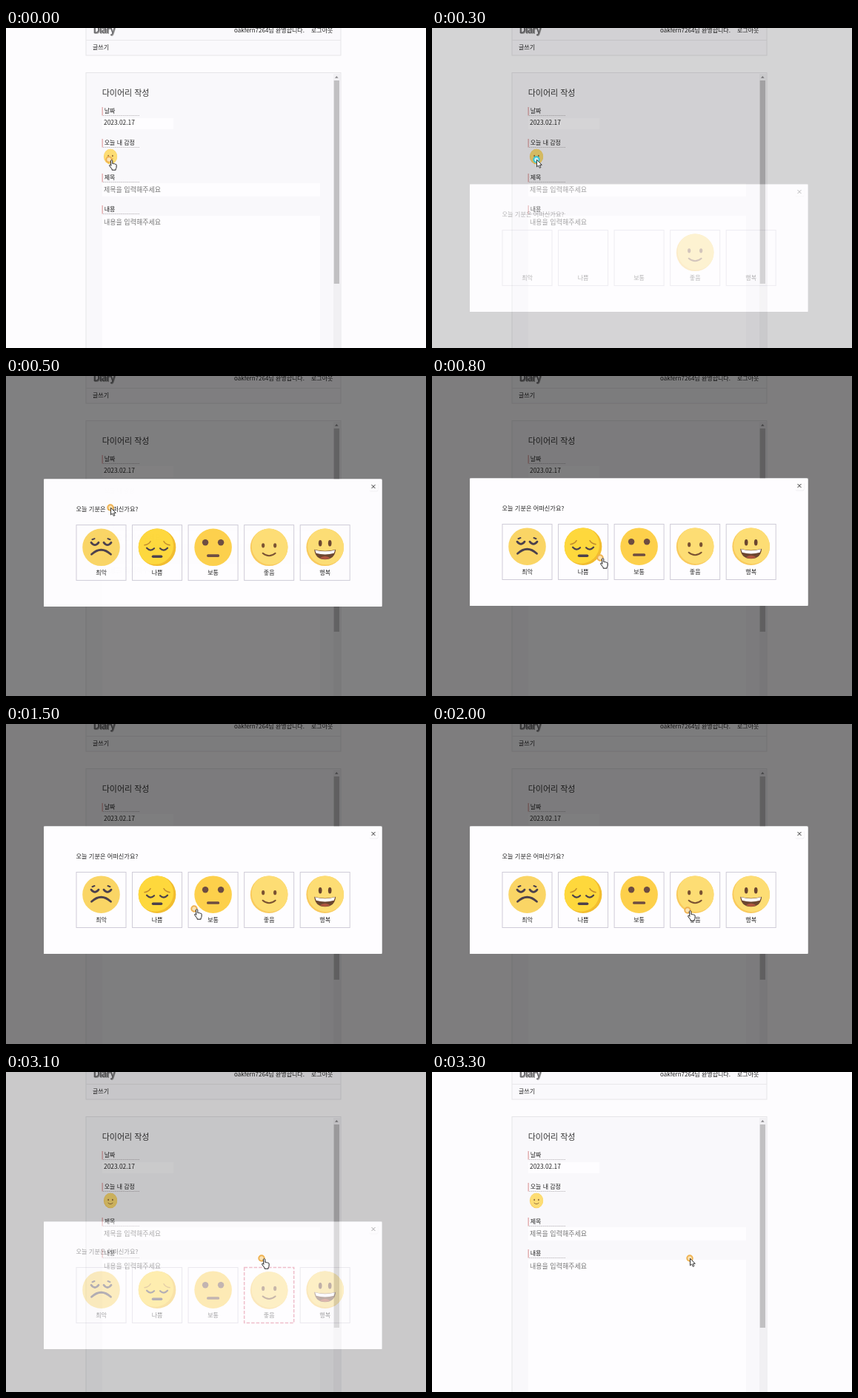
These frames come from a looping animation (567x433 px, 4000 ms). An HTML page:

```html
<!DOCTYPE html>
<html lang="ko">
<head>
<meta charset="utf-8">
<title>다이어리 작성</title>
<style>
  html, body { margin: 0; width: 100%; height: 100%; overflow: hidden; background: #fdfcfe; }
  svg { display: block; width: 567px; height: 433px; }
  text { font-family: "Noto Sans CJK KR", "Noto Sans CJK", "Noto Sans", sans-serif; font-size: 8px; fill: #222; }
  .hint { font-size: 9px; fill: #757575; }
  .line { fill: none; stroke-linecap: round; stroke-linejoin: round; }
</style>
</head>
<body>
<svg viewBox="0 0 567 433">
  <defs>
    <clipPath id="disc"><circle r="25.3"/></clipPath>

    <g id="worst">
      <circle r="25.3" fill="#fad565"/>
      <g class="line" stroke="#4b404c" stroke-width="2.8">
        <path d="M-13.5 -6.5q5 6.5 10 0M3.5 -6.5q5 6.5 10 0M-13 9.5Q0 -2.5 13 9.5"/>
        <path d="M-12 -10.5l3 -1.2M12 -10.5l-3 -1.2" stroke-width="2"/>
      </g>
    </g>

    <g id="bad">
      <circle r="25.3" fill="#f2bd2e"/>
      <circle cx="-3" cy="-2" r="25" fill="#fed83c" clip-path="url(#disc)"/>
      <g class="line">
        <path d="M-17 -3q6 -1 8 -5M17 -3q-6 -1 -8 -5" stroke="#c08a2c" stroke-width="1.5"/>
        <path d="M-14 1q5 5.5 10 .5M4 1.5q5 5 10 -.5" stroke="#4b404c" stroke-width="2.2"/>
        <path d="M-5.5 12.5h11" stroke="#4b404c" stroke-width="3.6"/>
      </g>
    </g>

    <g id="soso">
      <circle r="25.3" fill="#fdd04b"/>
      <g fill="#6d4c41">
        <circle cx="-10.5" cy="-6.5" r="4.2"/>
        <circle cx="10.5" cy="-6.5" r="4.2"/>
        <rect x="-8.5" y="9.5" width="17" height="3.6" rx="1.6"/>
      </g>
    </g>

    <g id="good">
      <circle r="25.3" fill="#f9ca5c"/>
      <circle cx="1.5" cy="-1.5" r="25" fill="#fddd74" clip-path="url(#disc)"/>
      <g fill="#7a5232">
        <ellipse cx="-8" cy="-2.5" rx="2.1" ry="3.1"/>
        <ellipse cx="8" cy="-2.5" rx="2.1" ry="3.1"/>
      </g>
      <path class="line" d="M-8.5 8Q0 15 8.5 8" stroke="#7a5232" stroke-width="2"/>
    </g>

    <g id="happy">
      <circle r="25.3" fill="#f9ca5c"/>
      <circle cx="1.5" cy="-1.5" r="25" fill="#fddd74" clip-path="url(#disc)"/>
      <g fill="#6b4630">
        <ellipse cx="-6.5" cy="-5.5" rx="2.3" ry="4.2"/>
        <ellipse cx="6.5" cy="-5.5" rx="2.3" ry="4.2"/>
        <path d="M-14.5 3Q0 7 14.5 3Q13 16.5 0 16.5T-14.5 3z"/>
      </g>
      <path d="M-13.5 3.6Q0 7.4 13.5 3.6L12 8Q0 11.5 -12 8z" fill="#fff"/>
      <path d="M-7 14.5Q0 9.5 7 14.5Q0 18 -7 14.5z" fill="#b0563f"/>
    </g>
  </defs>

  <rect width="567" height="433" fill="#fdfcfe"/>
  <g id="page"></g>
  <path id="shade" fill-rule="evenodd"/>
  <g id="modal">
    <rect x="51" y="138.5" width="456.5" height="172.5" rx="2" fill="#fefdff"/>
    <rect x="490.5" y="143.5" width="12" height="12" rx="2" fill="#f0eff2"/>
    <rect x="490" y="142" width="12" height="12.5" rx="2" fill="#fefdff"/>
    <path class="line" d="M493.8 146.3l4.4 4.4m0 -4.4l-4.4 4.4" stroke="#333" stroke-width="1"/>
    <text x="94.5" y="182" style="font-size:8.2px">오늘 기분은 어떠신가요?</text>
    <g id="moods"></g>
  </g>
  <g id="cursor">
    <circle id="ring" r="3.7" stroke-width="2"/>
    <path id="hand" class="line" fill="#fff" stroke="#222" stroke-width="1"
      style="fill:#fff" d="M2.6 1.2q1.2 -1.3 2.2 .2v4.2q1.1 -.8 1.9 .3q1.1 -.6 1.8 .4q1.3 -.4 1.6 .9v3q-.2 1.7 -1 2.6v1.4h-5v-1.3l-3.4 -4.3q-.5 -1.5 1 -1.4l.9 .9z"/>
    <path id="arrow" d="M.5 .3v9.6l2.2 -2l1.6 3.4l1.6 -.7l-1.5 -3.3h2.9z" fill="#fff" stroke="#222" stroke-width=".9"/>
  </g>
</svg>

<script>
const $ = id => document.getElementById(id);
const LOOP = 4000, STEP = 100, SLIDE = 108;

const rect = (x, y, w, h, fill, more = '') =>
  `<rect x="${x}" y="${y}" width="${w}" height="${h}" fill="${fill}" ${more}/>`;
const text = (x, y, s, more = '') => `<text x="${x}" y="${y}" ${more}>${s}</text>`;
const label = (y, s) =>
  rect(129.6, y - 8, 1, 11.5, '#d98c8c') +
  `<path d="M131 ${y + 3.5}H180" stroke="#b4b0b4" stroke-width=".8" stroke-dasharray="1 .6"/>` +
  text(132.7, y, s, 'font-weight="500"');

const border = 'stroke="#e6e5e8"';
$('page').innerHTML =
  rect(108, -5, 344, 42, '#faf9fc', border) +
  rect(108, 16, 344, 1, '#e9e8eb') +
  text(118.2, 8, 'Diary', 'style="font-size:13px;letter-spacing:-1px;fill:#aaa" font-weight="700"') +
  text(117.4, 7, 'Diary', 'style="font-size:13px;letter-spacing:-1px;fill:#6d6c6f" font-weight="700"') +
  text(308, 6, 'oakfern7264님 환영합니다.') +
  text(412, 6, '로그아웃') +
  text(117, 29, '글쓰기') +
  rect(108, 60.5, 344, 380, '#f9f8fb', border) +
  rect(442, 62, 9, 371, '#f1f0f3') +
  rect(442.7, 71, 7.3, 275, '#c1c0c2') +
  '<path d="M444 67.7l2.3 -2.6l2.3 2.6z" fill="#8a898c"/>' +
  text(129.7, 92, '다이어리 작성', 'style="font-size:11px;fill:#333"') +
  label(115, '날짜') +
  rect(130, 122, 96, 15, '#fefdff') +
  text(132, 131.3, '2023.02.17', 'style="font-size:8.4px"') +
  label(158, '오늘 내 감정') +
  '<use href="#good" transform="translate(141 174) scale(.36 .41)"/>' +
  label(205, '제목') +
  rect(130, 210, 294, 18, '#fefdff') +
  text(132, 222, '제목을 입력해주세요', 'class="hint"') +
  label(248, '내용') +
  rect(130, 254, 294, 190, '#fefdff') +
  text(132, 265.7, '내용을 입력해주세요', 'class="hint"');

const moods = [['worst', '최악'], ['bad', '나쁨'], ['soso', '보통'], ['good', '좋음'], ['happy', '행복']];
$('moods').innerHTML = moods.map(([id, name], i) =>
  `<g transform="translate(${94.5 + 75.55 * i} 200)">` +
  `<rect id="box-${id}" x=".5" y=".5" width="67" height="75" fill="none" stroke="#cfccd8"/>` +
  `<use id="face-${id}" href="#${id}" x="34" y="30.7"/>` +
  text(34, 67.8, name, 'text-anchor="middle"') + '</g>').join('');

// pointer path: [ms, x, y]
const path = [
  [0, 139, 178], [200, 139, 178], [300, 141, 178], [600, 141, 178], [700, 178, 210],
  [800, 227, 246], [900, 242, 249], [1000, 248, 249], [1400, 248, 249], [1500, 254, 250],
  [1700, 300, 253], [1900, 340, 252], [2000, 345, 252], [3100, 345, 252], [3200, 348, 252], [LOOP, 348, 252]
];

function pointAt(t) {
  const k = Math.max(1, path.findIndex(p => p[0] >= t));
  const [a, b] = [path[k - 1], path[k]];
  const f = (t - a[0]) / (b[0] - a[0]);
  return [a[1] + (b[1] - a[1]) * f, a[2] + (b[2] - a[2]) * f];
}

const clamp = v => Math.min(1, Math.max(0, v));
const within = (t, a, b) => t >= a && t < b;
const show = (el, on) => el.setAttribute('display', on ? 'inline' : 'none');

function openness(t) {
  if (t < 3100) return clamp((t - 203) / 300);
  return t < 3300 ? clamp(0.407 - (t - 3100) / 300) : 0;
}

function draw(t) {
  const p = openness(t), dy = (1 - p) * SLIDE;
  const top = 138.5 + dy;
  $('shade').setAttribute('d', `M0 0H567V433H0zM51 ${top}h456.5v172.5h-456.5z`);
  $('shade').setAttribute('opacity', p * 0.5);
  show($('shade'), p > 0);
  show($('modal'), p > 0);
  $('modal').setAttribute('transform', `translate(0 ${dy})`);
  $('modal').setAttribute('opacity', p);

  for (const [id] of moods) show($('face-' + id), id === 'good' || t >= 500);

  const picked = t >= 2400;
  const box = $('box-good');
  box.setAttribute('stroke', picked ? '#db6482' : '#cfccd8');
  box.setAttribute('stroke-width', picked ? 1.5 : 1);
  box.setAttribute('stroke-dasharray', picked ? '4.5 2' : 'none');
  $('face-good').setAttribute('y', picked ? 31.4 : 30.7);

  const [x, y] = pointAt(t);
  const arrow = within(t, 300, 700) || t >= 3200;
  const click = within(t, 200, 500) || within(t, 2400, 2600);
  $('cursor').setAttribute('transform', `translate(${x} ${y})`);
  show($('arrow'), arrow);
  show($('hand'), !arrow);
  $('ring').setAttribute('stroke', click ? '#35c4d6' : '#efb150');
  $('ring').setAttribute('fill', click ? '#c9eef0' : '#fbe3b4');
}

const start = performance.now();
function tick() {
  const t = (performance.now() - start) % LOOP;
  draw(Math.floor(t / STEP) * STEP);
  requestAnimationFrame(tick);
}
draw(0);
requestAnimationFrame(tick);
</script>
</body>
</html>
```
